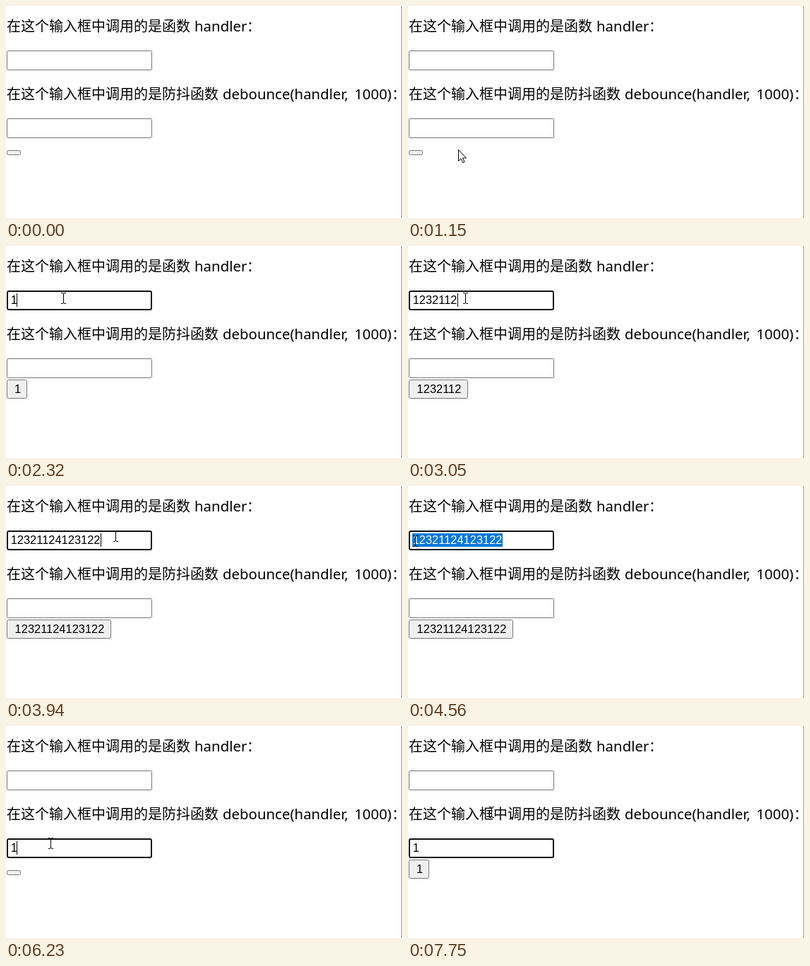
Animation of 561 by 300 pixels, one loop 8000 ms. Source, as an HTML page:

```html
<!DOCTYPE html>
<html lang="zh-CN">
<head>
<meta charset="utf-8">
<title>debounce</title>
<style>
  html, body { margin: 0; width: 100%; height: 100%; overflow: hidden; background: #fff; }
  svg { display: block; }
  .zh { font: 350 20px "Noto Sans CJK SC", "Noto Sans CJK", sans-serif; }
  .en { font: 20.4px "Noto Sans", "Open Sans", sans-serif; word-spacing: 3px; }
  .value { font: 16.44px "Liberation Sans", Arial, sans-serif; }
  .box { fill: #fff; stroke: #767676; }
  .box.hover { stroke: #4f4f4f; }
  .box.focus { stroke: #101010; stroke-width: 2; }
  #button { fill: #efefef; stroke: #767676; }
  #label { text-anchor: middle; }
  #selection { fill: #0078d7; }
  #selected { fill: #fff; }
  #beam { fill: none; stroke: #000; }
  #arrow { fill: #fff; stroke: #000; stroke-linejoin: round; }
</style>
</head>
<body>
<svg width="561" height="300" viewBox="0 0 561 300">
  <path d="M560.5 0v300" stroke="#a0a0a0"/>
  <text class="zh" x="1" y="36">在这个输入框中调用的是函数</text>
  <text class="en" x="267" y="36">handler</text>
  <text class="zh" x="341" y="36">：</text>
  <text class="zh" x="1" y="132">在这个输入框中调用的是防抖函数</text>
  <text class="en" x="307" y="132">debounce(handler, 1000)</text>
  <text class="zh" x="546.5" y="132">：</text>

  <rect class="box"/>
  <rect class="box"/>
  <rect id="selection" y="67" height="19"/>
  <text class="value" id="first" x="6.7" y="82"></text>
  <text class="value" id="selected" y="82"></text>
  <text class="value" id="second" x="6.7" y="178"></text>
  <rect id="caret" width="1" height="19"/>
  <rect id="button" x="1.5" rx="2"/>
  <text class="value" id="label" y="208"></text>

  <path id="beam" d="M-3 -7.5h2l1.5 1l1.5 -1h2M.5 -7v14M-3 7.5h2l1.5 -1l1.5 1h2"/>
  <path id="arrow" d="M.5 .5v16l3.7 -3.5l2.6 5.7l2.3 -1l-2.6 -5.6h5z"/>
</svg>
<script>
const LOOP = 8000, SAMPLE = 120, BLINK = 500, DEBOUNCE = 1000;
const DIGIT = 9.14, TEXT_X = 6.1;
const TYPED = '12321124123122';
const FIELD_Y = [63, 159], LINE_Y = [15, 111];
const FOCUS_FIRST = 1660, SELECT = 4320, CLEAR = 5350, FOCUS_SECOND = 5860, TYPE_SECOND = 6220;

// Pointer strokes: start, end, target x, target y. It rests in between.
const strokes = [
  [1030, 1030, 72, 278], [1030, 1390, 70, 54], [1390, 1510, 71, 82], [1680, 1920, 81, 74],
  [3050, 3560, 155, 71], [4070, 4190, 164, 74], [SELECT, 4560, 10, 78],
  [5230, CLEAR, 8, 93], [CLEAR, 5590, 63, 166], [6230, 6590, 99, 143], [6590, 6970, 118, 122]
];

// Bursts of typing: start, digits, ms between digits.
const bursts = [[2320, 5, 120], [3050, 2, 0], [3170, 5, 80], [3940, 2, 0]];
const keyTimes = bursts.flatMap(([start, digits, gap]) =>
  Array.from({ length: digits }, (_, i) => start + i * gap));
const caretResets = [FOCUS_FIRST, ...keyTimes, CLEAR, FOCUS_SECOND, TYPE_SECOND];

const $ = id => document.getElementById(id);
const boxes = document.querySelectorAll('.box');
const set = (el, attrs) => { for (const k in attrs) el.setAttribute(k, attrs[k]); };
const show = (el, on) => set(el, { visibility: on ? 'visible' : 'hidden' });
const inside = (y, top) => y >= top && y < top + 28;

// The pointer is sampled, so each stroke advances in a few even steps.
function pointerAt(t) {
  let x = -50, y = -50;
  for (const [start, end, toX, toY] of strokes) {
    if (t < start) break;
    const steps = Math.max(1, Math.round((end - start) / SAMPLE));
    const p = t >= end ? 1 : Math.floor((t - start) / (end - start) * steps) / steps;
    x += (toX - x) * p;
    y += (toY - y) * p;
  }
  return [Math.round(x), Math.round(y)];
}

function drawField(box, top, focused, hovered) {
  const inset = focused ? 1 : 0.5;
  set(box, {
    class: 'box' + (focused ? ' focus' : hovered ? ' hover' : ''),
    x: 1 + inset, y: top + inset, width: 206 - 2 * inset, height: 28 - 2 * inset,
    rx: focused ? 2 : 1
  });
}

function drawButton(label) {
  const width = 20 + label.length * DIGIT;
  set($('button'), {
    y: label ? 189.5 : 204.5,
    width: Math.round(width) - 1,
    height: label ? 26 : 6
  });
  $('label').textContent = label;
  set($('label'), { x: 2 + width / 2 });
}

function drawPointer(x, y) {
  const overText = [...LINE_Y, ...FIELD_Y].some(top => inside(y, top));
  for (const id of ['beam', 'arrow']) {
    set($(id), { transform: `translate(${x} ${y})` });
    show($(id), (id === 'beam') === overText);
  }
}

function draw(t) {
  const [x, y] = pointerAt(t);
  const focus = t < FOCUS_FIRST ? -1 : t < FOCUS_SECOND ? 0 : 1;
  const selecting = t >= SELECT && t < CLEAR;
  const first = t < CLEAR ? TYPED.slice(0, keyTimes.filter(k => k <= t).length) : '';
  const second = t < TYPE_SECOND ? '' : '1';

  FIELD_Y.forEach((top, i) =>
    drawField(boxes[i], top, focus === i, x > 0 && x < 207 && inside(y, top)));

  const dragged = Math.round((x - TEXT_X) / DIGIT);
  const from = selecting ? Math.min(first.length, dragged) : first.length;
  const left = TEXT_X + from * DIGIT;
  $('first').textContent = first.slice(0, from);
  $('selected').textContent = first.slice(from);
  $('second').textContent = second;
  set($('selected'), { x: left + 0.6 });
  set($('selection'), { x: left, width: (first.length - from) * DIGIT });

  const length = (focus === 1 ? second : first).length;
  const idle = t - caretResets.findLast(reset => reset <= t);
  set($('caret'), { x: Math.floor(TEXT_X + length * DIGIT), y: FIELD_Y[Math.max(0, focus)] + 4 });
  show($('caret'), focus >= 0 && !selecting && idle % (2 * BLINK) < BLINK);

  drawButton(t >= TYPE_SECOND + DEBOUNCE ? second : first);
  drawPointer(x, y);
}

const begin = performance.now();
function tick() {
  draw((performance.now() - begin) % LOOP);
  requestAnimationFrame(tick);
}
tick();
</script>
</body>
</html>
```
